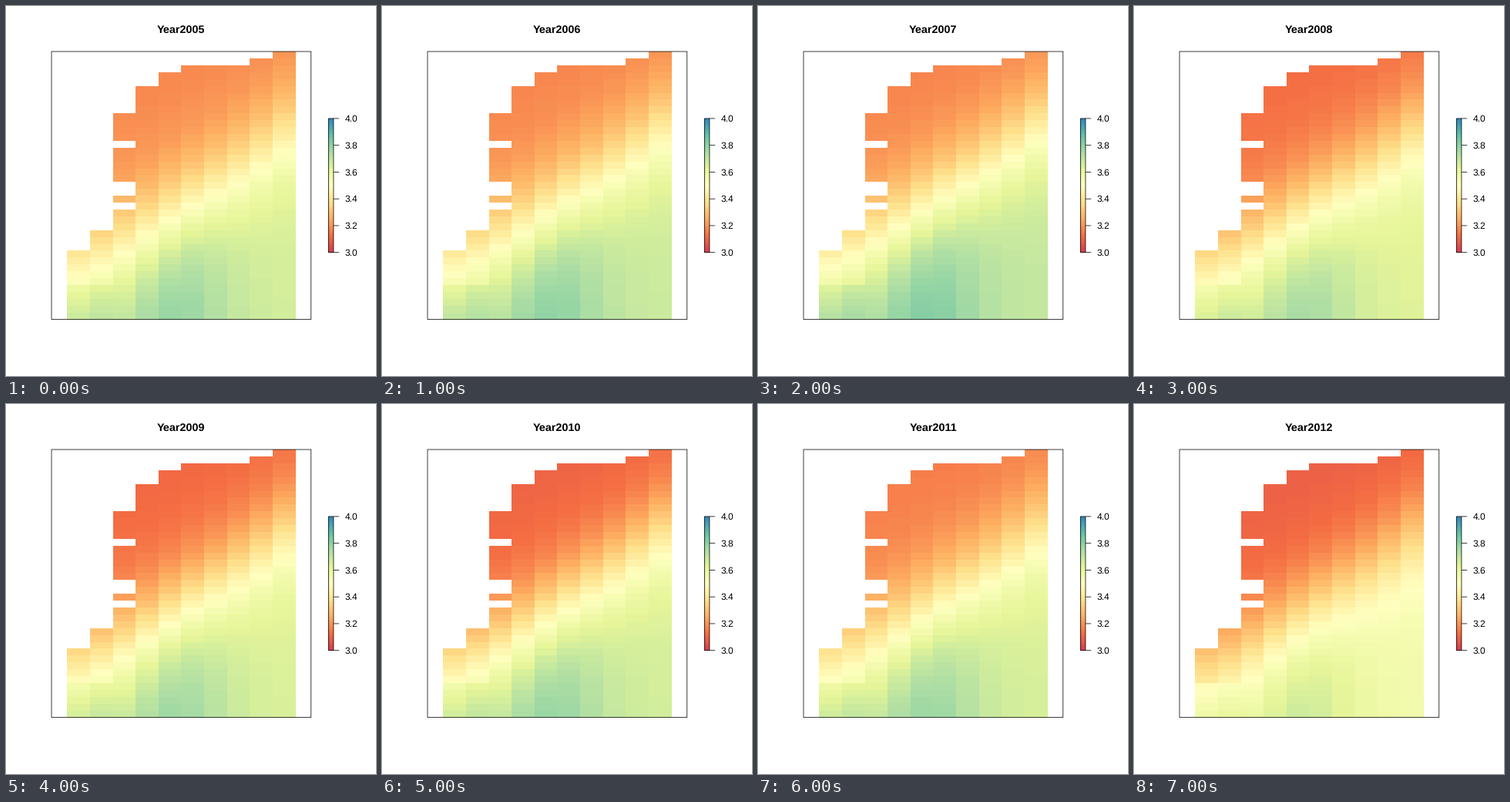
Recreate the animation shown at these times as a matplotlib script. Size 480 px wide and 480 px high, loop 8 s.

```python
import numpy as np
import matplotlib.pyplot as plt
from matplotlib.animation import FuncAnimation
from matplotlib.colors import LinearSegmentedColormap
from matplotlib.patches import Rectangle

SIZE, DPI = 480, 100
PX = 72 / DPI  # points per pixel
LINE = 0.75 * PX
ROWS, COLS = 39, 10
FIRST_YEAR = 2005

plt.rcParams["font.family"] = "Liberation Sans"
plt.rcParams["text.hinting"] = "none"
spectral = LinearSegmentedColormap.from_list("spectral", [
    "#D53E4F", "#F46D43", "#FDAE61", "#FEE08B", "#FFFFBF",
    "#E6F598", "#ABDDA4", "#66C2A5", "#3288BD"], N=200)

# Per year: change of the low level, of the high level, rows moved up
YEARS = [
    (0, 0, 0), (-.005, .015, .5), (-.008, .033, 1), (-.052, -.03, 0),
    (-.065, -.015, 0), (-.078, 0, 0), (-.022, -.008, 0), (-.085, -.105, -.5),
]

row = np.arange(ROWS)[:, None]
col = np.arange(COLS)
first_row = np.array([29, 26, 9, 5, 3, 2, 2, 2, 1, 0])
hidden = row < first_row
hidden[[13, 19, 20, 22], 2] = True  # gaps along the coast


def levels(i):
    """Each column climbs from low to high along a logistic curve."""
    d_low, d_high, lift = YEARS[i]
    low = 3.175 + 0.05 * np.exp(-col) + d_low
    high = 3.72 - 0.006 * col + 0.11 * np.exp(-((col - 4.2) / 2.2) ** 2) + d_high
    middle = 31.5 - 1.7 * col - 0.06 * col ** 2 - lift
    v = low + (high - low) / (1 + np.exp((middle - row) / 4.3))
    v[34:, :2] += 0.05  # step near the lower left corner
    return np.ma.array(v, mask=hidden)


fig = plt.figure(figsize=(SIZE / DPI, SIZE / DPI), dpi=DPI, facecolor="white")
ax = fig.add_axes([0, 0, 1, 1])
ax.axis("off")


def outline(x0, y0, x1, y1):
    ax.add_patch(Rectangle((x0, y0), x1 - x0, y1 - y0, fill=False, ec="black",
                           lw=LINE, joinstyle="miter", snap=False, zorder=3))


def cells(x, y, values):
    return ax.pcolormesh(np.round(x), np.round(y), values, cmap=spectral,
                         vmin=3, vmax=4, antialiased=False)


left, top, right, bottom = 59.04, 59.04, 395.76, 406.56
mesh = cells(np.linspace(79.3, 375.6, COLS + 1),
             np.linspace(top, bottom, ROWS + 1), levels(0))
outline(left, top, right, bottom)

# Colour scale
bar_x = np.array([418.44, 424.92])
bar_top, bar_bottom = 145.92, 319.68
cells(bar_x, np.linspace(bar_top, bar_bottom, 175),
      np.linspace(4, 3, 174)[:, None])
outline(bar_x[0], bar_top, bar_x[1], bar_bottom)
for value in np.linspace(3, 4, 6):
    y = bar_bottom + (value - 3) * (bar_top - bar_bottom)
    ax.plot([bar_x[1], bar_x[1] + 7.2], [y, y], color="black", lw=LINE,
            solid_capstyle="butt", snap=False)
    ax.text(bar_x[1] + 14.4, y + 4, f"{value:.1f}", size=12 * PX)

title = ax.text((left + right) / 2, 35, "", size=14.4 * PX, weight="bold",
                ha="center")
ax.set_xlim(0, SIZE)
ax.set_ylim(SIZE, 0)


def draw(i):
    mesh.set_array(levels(i))
    title.set_text(f"Year{FIRST_YEAR + i}")
    return mesh, title


anim = FuncAnimation(fig, draw, frames=len(YEARS), interval=1000,
                     repeat=True, repeat_delay=0)
plt.show()
```
